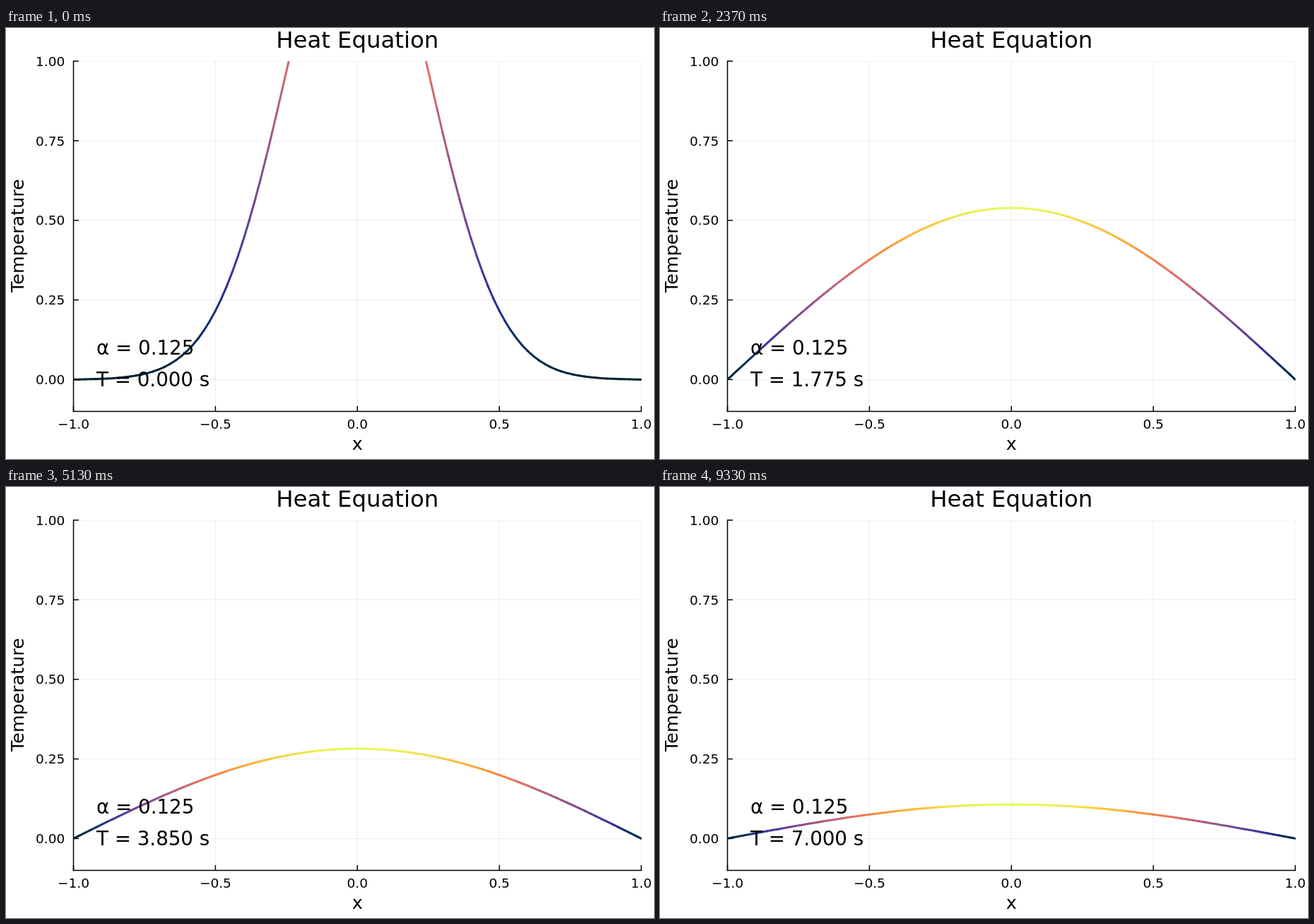
Recreate the animation shown at these times as an HTML page. Size 917 by 611 pixels, loop 9360 ms.

```html
<!DOCTYPE html>
<html lang="en">
<head>
<meta charset="utf-8">
<title>Heat Equation</title>
<style>
  html, body { margin: 0; width: 100%; height: 100%; overflow: hidden; background: #fff; }
  svg { display: block; width: 917px; height: 611px; }
  text { font-family: "DejaVu Sans", sans-serif; fill: #000; white-space: pre; }
  .grid line { stroke: #000; stroke-opacity: .1; stroke-width: .8; }
  .axes line { stroke: #000; stroke-width: 1.5; }
  .curve line { stroke-width: 3.05; stroke-linecap: round; }
  .ticks text { font-size: 18.5px; }
  .note text { font-size: 27.7px; }
</style>
</head>
<body>
<svg viewBox="0 0 917 611">
  <clipPath id="plot"><rect x="95" y="47" width="804.4" height="497"/></clipPath>
  <g class="grid" clip-path="url(#plot)"></g>
  <g class="axes"></g>
  <g class="ticks"></g>
  <text x="497.2" y="28" font-size="32.3" text-anchor="middle">Heat Equation</text>
  <text x="497.2" y="598.3" font-size="25.4" text-anchor="middle">x</text>
  <text transform="translate(25 294.5) rotate(-90)" font-size="25.4" text-anchor="middle">Temperature</text>
  <g class="curve" clip-path="url(#plot)"></g>
  <g class="note">
    <text x="128" y="463.3">α = 0.125</text>
    <text x="128" y="508.4" id="clock">T = 0.000 s</text>
  </g>
</svg>
<script>
const LOOP = 9360, LAST = 280, DT = 0.025;
const ALPHA = 0.125, SIGMA = 0.25, N = 100, MODES = 24;
const THERMAL = [
  [3, 35, 51], [13, 48, 100], [53, 50, 155], [93, 62, 153], [126, 77, 143], [158, 89, 135],
  [193, 100, 121], [225, 113, 97], [246, 139, 69], [251, 173, 60], [246, 211, 70], [231, 250, 90]
];
const LEFT = 95.5, RIGHT = 899, TOP = 47, BOTTOM = 543.5;
const px = x => LEFT + (x + 1) / 2 * (RIGHT - LEFT);
const py = y => BOTTOM - (y + 0.1) / 1.1 * (BOTTOM - TOP);
const pick = s => document.querySelector(s);

function add(parent, tag, attrs, text) {
  const el = document.createElementNS("http://www.w3.org/2000/svg", tag);
  for (const k in attrs) el.setAttribute(k, attrs[k]);
  if (text) el.textContent = text;
  return parent.appendChild(el);
}
const line = (parent, x1, y1, x2, y2) => add(parent, "line", { x1, y1, x2, y2 });

const grid = pick(".grid"), axes = pick(".axes"), ticks = pick(".ticks");
line(axes, LEFT, BOTTOM + 0.7, LEFT, TOP - 0.7);
line(axes, LEFT - 0.7, BOTTOM, RIGHT + 0.7, BOTTOM);
for (let i = 0; i < 5; i++) {
  const xv = i / 2 - 1, yv = i / 4, x = px(xv), y = py(yv);
  line(grid, x, TOP, x, BOTTOM);
  line(grid, LEFT, y, RIGHT, y);
  line(axes, x, BOTTOM, x, BOTTOM - 7.5);
  line(axes, LEFT, y, LEFT + 7.5, y);
  add(ticks, "text", { x, y: 567.7, "text-anchor": "middle" }, xv.toFixed(1).replace("-", "−"));
  add(ticks, "text", { x: 83.2, y: y + 6.8, "text-anchor": "end" }, yv.toFixed(2));
}

const curve = pick(".curve"), clock = pick("#clock");
const segments = Array.from({ length: N }, () => add(curve, "line", {}));

// Fourier series of a normal density spreading between cold walls
function temperature(t) {
  const u = new Array(N + 1).fill(0);
  for (let m = 0; m < MODES; m++) {
    const k = (2 * m + 1) * Math.PI / 2;
    const a = Math.exp(-k * k * (SIGMA * SIGMA / 2 + ALPHA * t));
    for (let i = 0; i <= N; i++) u[i] += a * Math.cos(k * (2 * i / N - 1));
  }
  return u;
}

function heatColor(v) {
  const s = Math.min(Math.max(v, 0), 1) * (THERMAL.length - 1);
  const i = Math.min(Math.floor(s), THERMAL.length - 2);
  const mix = THERMAL[i].map((c, j) => Math.round(c + (THERMAL[i + 1][j] - c) * (s - i)));
  return `rgb(${mix})`;
}

function draw(step) {
  const t = step * DT, u = temperature(t), peak = Math.max(...u);
  segments.forEach((el, i) => {
    el.setAttribute("x1", px(2 * i / N - 1));
    el.setAttribute("y1", py(u[i]));
    el.setAttribute("x2", px(2 * (i + 1) / N - 1));
    el.setAttribute("y2", py(u[i + 1]));
    el.setAttribute("stroke", heatColor(u[i] / peak));
  });
  clock.textContent = `T = ${t.toFixed(3)} s`;
}

// 30 steps per second, each starting on a 10 ms tick
let shown = -1;
function tick() {
  const ms = Math.floor(performance.now() % LOOP / 10) * 10;
  const step = Math.min(LAST, Math.floor((ms + 4) * 0.03));
  if (step !== shown) draw(shown = step);
  requestAnimationFrame(tick);
}
tick();
</script>
</body>
</html>
```
